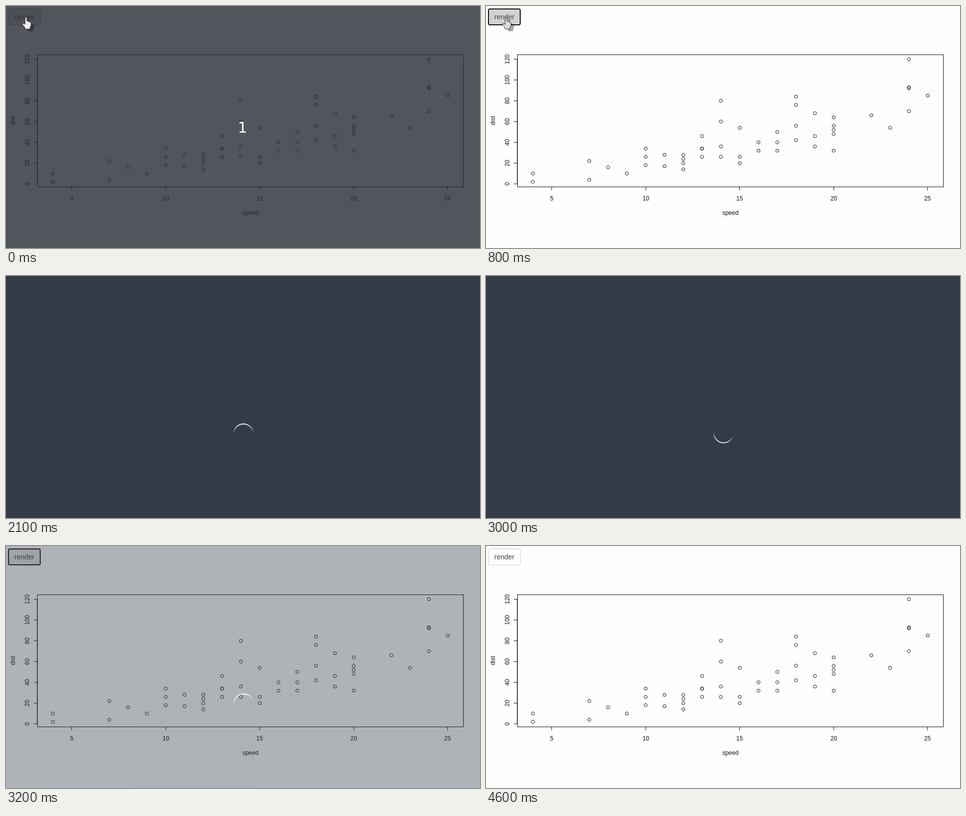
These frames come from a looping animation (956x489 px, 4700 ms). An HTML page:

```html
<!DOCTYPE html>
<html lang="en">
<head>
<meta charset="utf-8">
<title>Render</title>
<style>
  html, body { margin: 0; width: 100%; height: 100%; overflow: hidden; background: #fefefe; }
  svg { display: block; width: 956px; height: 489px; }
  text { font: 12px "Liberation Sans", Arial, sans-serif; text-anchor: middle; }
  #plot { fill: none; stroke: #111; }
  #plot text { fill: #111; stroke: none; }
  #label { font-size: 14px; fill: #444; }
  #count text { font: 30px "DejaVu Sans", sans-serif; fill: #fff; }
</style>
</head>
<body>
<svg viewBox="0 0 956 489">
  <rect width="956" height="489" fill="#fefefe"/>
  <g id="button">
    <rect id="face" x="4.5" y="5.5" width="65" height="33" rx="4"/>
    <rect id="ring" x="5" y="6" width="64" height="32" rx="3" fill="none" stroke="#111319" stroke-width="2"/>
    <text id="label" x="37" y="27">render</text>
  </g>
  <g id="plot">
    <rect x="63.5" y="98.5" width="859" height="267"/>
    <path d="M63 107V360"/>
    <text x="493" y="422">speed</text>
    <text transform="translate(18 231.5) rotate(-90)">dist</text>
  </g>
  <g id="waiter">
    <rect width="956" height="489" fill="#333c46"/>
    <path id="spinner" d="M-20 0A20 20 0 0 1 20 0A20.1 20.1 0 0 0-20 0Z" fill="#f2f2f8"/>
  </g>
  <g id="count">
    <rect width="956" height="489" fill="#272b33" fill-opacity=".8"/>
    <text x="477" y="255.5">1</text>
  </g>
  <defs>
    <path id="handShape" d="M38.5 24Q38.5 22.5 40.2 22.5T42 24V30.5Q44.5 29.5 45 31.5Q47 30.5 47.5 32.5Q50.5 32 50.5 35V39L48.5 43V46.5H38.5V44L33.5 37.5Q32.5 34.5 35.5 35L38.5 37Z"/>
    <path id="arrowShape" d="M40.5 22.5V39L44.3 35.5L47 41.5L49.5 40.3L46.8 34.5H52Z"/>
  </defs>
  <g id="hand">
    <use href="#handShape" x="6" y="4.5" fill-opacity=".35"/>
    <use href="#handShape" id="glove" stroke="#333"/>
  </g>
  <use href="#arrowShape" id="arrow" fill="#eee" stroke="#222"/>
</svg>
<script>
  const LOOP = 4700;
  const $ = id => document.getElementById(id);
  const show = (id, on) => $(id).setAttribute("visibility", on ? "visible" : "hidden");
  const set = (id, attrs) => {
    for (const name in attrs) $(id).setAttribute(name, attrs[name]);
  };

  // Stopping distances grouped by speed
  const distances = {
    4: [2, 10], 7: [4, 22], 8: [16], 9: [10], 10: [18, 26, 34], 11: [17, 28],
    12: [14, 20, 24, 28], 13: [26, 34, 34, 46], 14: [26, 36, 60, 80],
    15: [20, 26, 54], 16: [32, 40], 17: [32, 40, 50], 18: [42, 56, 76, 84],
    19: [36, 46, 68], 20: [32, 48, 52, 56, 64], 22: [66], 23: [54],
    24: [70, 92, 93, 120], 25: [85]
  };
  const px = speed => 132.5 + (speed - 5) * 37.92;
  const py = dist => 359.5 - dist * 2.1;

  let marks = "";
  for (const speed in distances)
    for (const dist of distances[speed])
      marks += `<circle cx="${px(+speed)}" cy="${py(dist)}" r="3.2"/>`;
  for (let v = 5; v <= 25; v += 5) {
    const x = Math.floor(px(v)) + 0.5;
    marks += `<path d="M${x} 365V372.5"/><text x="${x}" y="393">${v}</text>`;
  }
  for (let v = 0; v <= 120; v += 20) {
    const y = Math.floor(py(v)) + 0.5;
    marks += `<path d="M56 ${y}H63"/><text transform="translate(46.5 ${y}) rotate(-90)">${v}</text>`;
  }
  $("plot").insertAdjacentHTML("beforeend", marks);

  // Time and angle pairs; the spinner holds still before the first
  const spin = [[1500, 0], [2100, 357], [3000, 913], [3200, 1067], [3500, 1260]];
  function spinAngle(t) {
    if (t <= spin[0][0]) return spin[0][1];
    const i = spin.findIndex(([time]) => t <= time);
    if (i < 0) return 0;
    const [t0, a0] = spin[i - 1], [t1, a1] = spin[i];
    return a0 + (a1 - a0) * (t - t0) / (t1 - t0);
  }

  function waiterOpacity(t) {
    if (t < 900 || t >= 3500) return 0;
    if (t < 3200) return 1;
    return 0.39 * ((3500 - t) / 300) ** 1.8;
  }

  function buttonStyle(t) {
    if (t < 800) return { fill: "#e6e6e6", stroke: "#adadad" };
    if (t < 900) return { fill: "#d2d2d2", stroke: "#8c8c8c" };
    if (t < 4600) return { fill: "#e2e4e2", stroke: "#8c8c8c" };
    return { fill: "#fefefe", stroke: "#ccccd2" };
  }

  function draw(now) {
    const t = Math.floor(now % LOOP / 100) * 100;
    set("face", buttonStyle(t));
    show("ring", t >= 800 && t < 4600);
    show("count", t < 100);
    show("hand", t < 900);
    set("glove", { fill: t < 800 ? "#eeeeee" : "#d8dcdc" });
    show("arrow", t >= 900 && t < 1600);
    set("arrow", { y: t < 1500 ? 0 : -9 });
    set("waiter", { opacity: waiterOpacity(t) });
    set("spinner", { transform: `translate(479 318) rotate(${spinAngle(t)})` });
  }

  const start = performance.now();
  function tick() {
    draw(performance.now() - start);
    requestAnimationFrame(tick);
  }
  tick();
</script>
</body>
</html>
```
